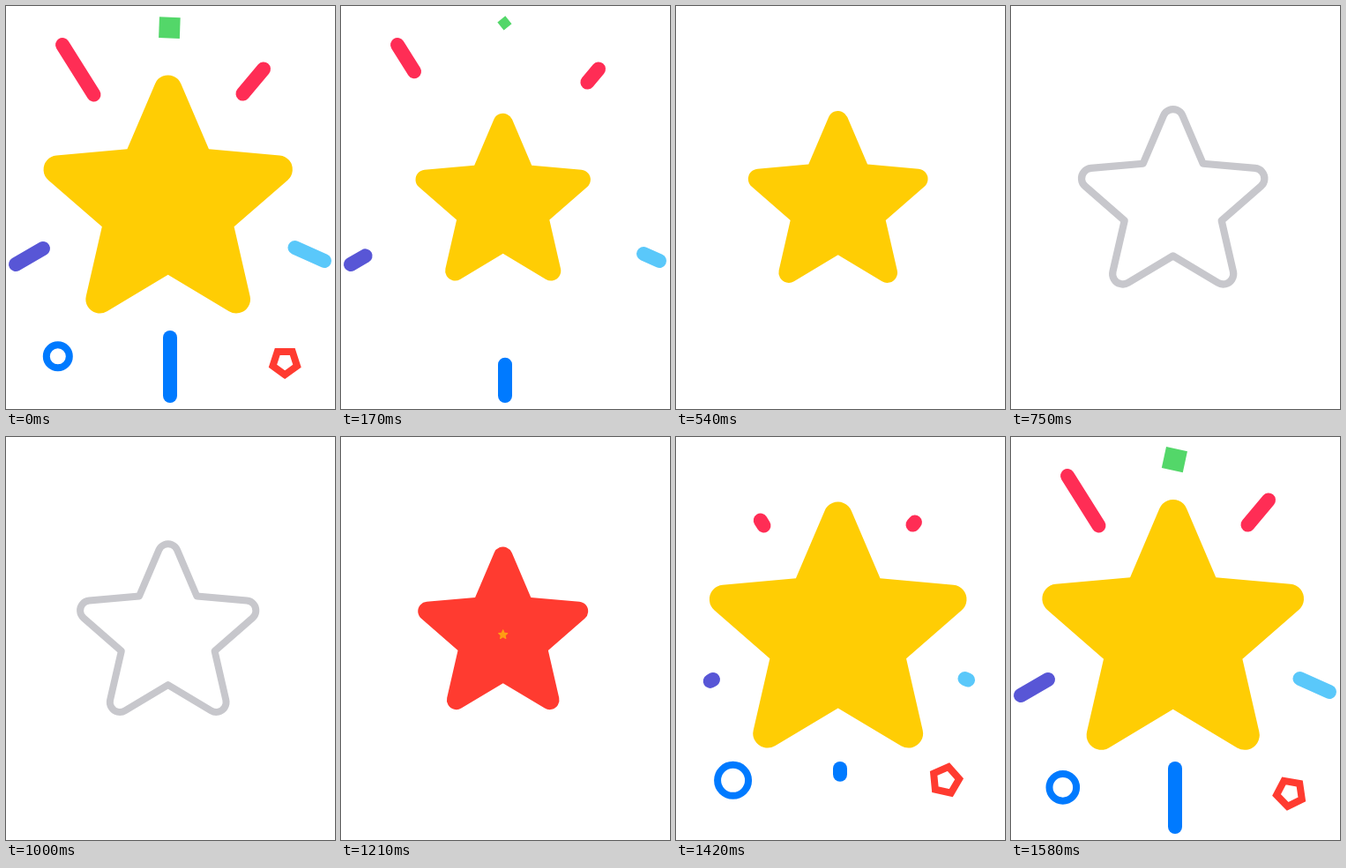
Recreate the animation shown at these times as an HTML page with a canvas. Size 373 px wide and 457 px high, loop 1.62 s.

```html
<!DOCTYPE html>
<html lang="en">
<head>
<meta charset="utf-8">
<title>Star burst</title>
<style>
html, body { margin: 0; width: 100%; height: 100%; overflow: hidden; background: #fff; }
canvas { display: block; }
</style>
</head>
<body>
<canvas id="stage" width="373" height="457"></canvas>
<script>
const ctx = document.getElementById('stage').getContext('2d');
const LOOP = 1620, STEPS = 39, RAD = Math.PI / 180;
const STAR = { x: 183.7, y: 224.1 }, HUB = { x: 184, y: 225 };
const GOLD = '#ffcd04', RED = '#ff3b30', GREY = '#c7c7cc';
const GREEN = '#53d769', BLUE = '#007aff', PINK = '#ff2d55';

// Colour, inner end, outer end
const DASHES = [
  [PINK, 99.5, 100.5, 64, 44],
  [PINK, 268.5, 99.5, 292, 71.5],
  ['#5856d6', 42, 275, 11, 293],
  ['#5ac8fa', 327.5, 274, 361, 289],
  [BLUE, 186, 376, 186, 442]
];

// Progress from 0 to 1 between steps a and b, with different easings
const linear = (t, a, b) => Math.min(1, Math.max(0, (t - a) / (b - a)));
const smooth = (t, a, b) => { const p = linear(t, a, b); return p * p * (3 - 2 * p); };
const easeIn = (t, a, b) => linear(t, a, b) ** 3;
const easeOut = (t, a, b) => 1 - (1 - linear(t, a, b)) ** 3;

const greyScale = t => 1.018 - .2 * smooth(t, 0, 10.5);
const redScale = t => 1.4 * smooth(t, 4, 10.45);
// Grows past full size, dips under it and settles
const goldScale = t =>
  1.48 * smooth(t, 7.25, 13.7) - .56 * smooth(t, 16.1, 23.4) + .08 * smooth(t, 23.4, 30);

function starPath(s) {
  const y = STAR.y + 1.4 * s, half = 67 * RAD;
  ctx.beginPath();
  for (let i = 0; i < 5; i++) {
    const tip = (i * 72 - 90) * RAD, notch = tip + 36 * RAD;
    ctx.arc(STAR.x + 95 * s * Math.cos(tip), y + 95 * s * Math.sin(tip), 11.5 * s, tip - half, tip + half);
    ctx.lineTo(STAR.x + 56.8 * s * Math.cos(notch), y + 56.8 * s * Math.sin(notch));
  }
  ctx.closePath();
}

function fillStar(s, color) {
  if (s <= 0) return;
  starPath(s);
  ctx.fillStyle = color;
  ctx.fill();
}

function strokeStar(s) {
  starPath(s);
  ctx.lineWidth = 8.1 * s;
  ctx.lineJoin = 'round';
  ctx.strokeStyle = GREY;
  ctx.stroke();
}

// Point at a distance from the hub, in a direction given in degrees
function ray(deg, dist) {
  return [HUB.x + dist * Math.cos(deg * RAD), HUB.y + dist * Math.sin(deg * RAD)];
}

function polygon([x, y], r, sides, deg) {
  ctx.beginPath();
  for (let i = 0; i < sides; i++) {
    const a = (deg + i * 360 / sides) * RAD;
    ctx.lineTo(x + r * Math.cos(a), y + r * Math.sin(a));
  }
  ctx.closePath();
}

function outline(size, color) {
  ctx.lineWidth = Math.min(8, size * 1.2);
  ctx.lineJoin = 'miter';
  ctx.strokeStyle = color;
  ctx.stroke();
}

function drawRing(t) {
  const r = 17.5 * smooth(t, 8, 12) * (1 - easeIn(t, 13.3, 20.7));
  if (r <= 0) return;
  ctx.beginPath();
  ctx.arc(...ray(126, 213 * easeOut(t, 8, 15.8)), r, 0, 2 * Math.PI);
  outline(r, BLUE);
}

function drawPentagon(t) {
  const r = 15.6 * smooth(t, 8, 12) * (1 - easeIn(t, 15.5, 21.5));
  if (r <= 0) return;
  polygon(ray(53.5, 222.3 * easeOut(t, 8, 16.8)), r, 5, 90 - 9.7 * (t - 18));
  outline(r, RED);
}

function drawSquare(t) {
  const side = 24.5 * smooth(t, 11, 14) * (1 - smooth(t, 17, 26.6));
  if (side <= 0) return;
  const dist = 199 * smooth(t, 11, 16.5) + 7 * smooth(t, 16, 23);
  polygon(ray(-89.6, dist), side * Math.SQRT1_2, 4, 47 - 10.2 * (t - 18));
  ctx.fillStyle = GREEN;
  ctx.fill();
}

function drawDashes(t) {
  const head = smooth(t, 12, 17), tail = smooth(t, 18, 26.4);
  if (head <= 0 || tail >= 1) return;
  ctx.lineWidth = 16;
  ctx.lineCap = 'round';
  for (const [color, x0, y0, x1, y1] of DASHES) {
    ctx.strokeStyle = color;
    ctx.beginPath();
    ctx.moveTo(x0 + (x1 - x0) * tail, y0 + (y1 - y0) * tail);
    ctx.lineTo(x0 + (x1 - x0) * head, y0 + (y1 - y0) * head);
    ctx.stroke();
  }
}

// Step 0 is the moment before the press; from step 36 the empty star rests.
function draw(t) {
  ctx.fillStyle = '#fff';
  ctx.fillRect(0, 0, 373, 457);
  if (t >= 36) return strokeStar(greyScale(0));
  if (t < 8) strokeStar(greyScale(t));
  drawRing(t);
  drawPentagon(t);
  drawSquare(t);
  drawDashes(t);
  if (t < 13) fillStar(redScale(t), RED);
  ctx.globalAlpha = linear(t, 7, 8.5);
  fillStar(goldScale(t), GOLD);
  ctx.globalAlpha = 1;
}

// 24 steps a second, with start times rounded to 10 ms
function stepAt(ms) {
  let k = STEPS - 1;
  while (k > 0 && Math.round(k / .24) * 10 > ms) k--;
  return (k + 18) % STEPS;
}

const start = performance.now();
function tick() {
  draw(stepAt((performance.now() - start) % LOOP));
  requestAnimationFrame(tick);
}
tick();
</script>
</body>
</html>
```
